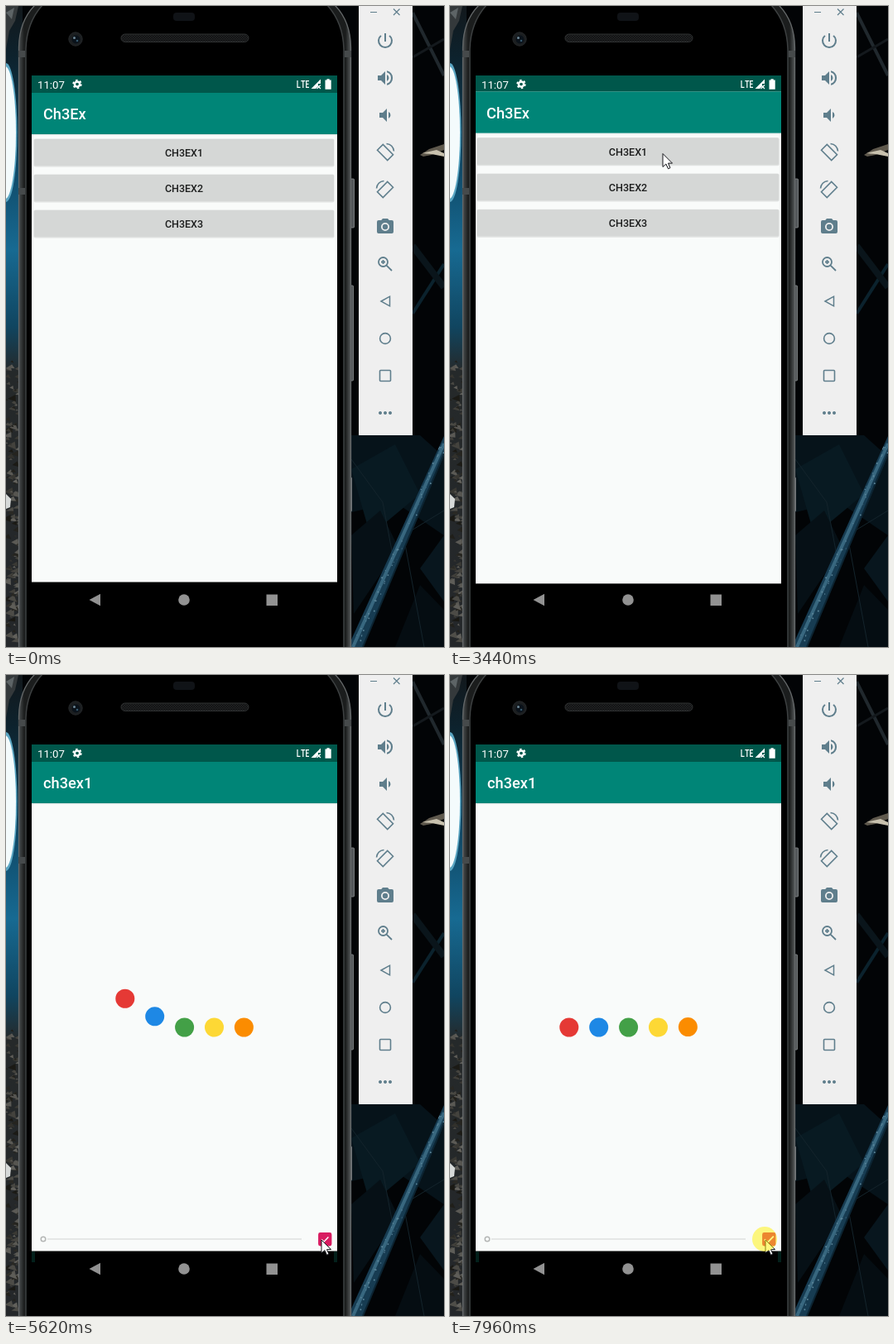
An HTML page that plays this animation: 529x775 px, repeating every 8000 ms.

```html
<!DOCTYPE html>
<html lang="en">
<head>
<meta charset="utf-8">
<title>Emulator demo</title>
<style>
html, body { margin: 0; width: 100%; height: 100%; overflow: hidden; background: #020406; }
svg { display: block; }
text { font-family: Roboto, sans-serif; }
.title { font-size: 18.2px; font-weight: 500; fill: #fff; }
.label { font-size: 12.5px; font-weight: 500; fill: #1d1e1e; text-anchor: middle; }
</style>
</head>
<body>
<svg width="529" height="775" viewBox="0 0 529 775">
  <defs>
    <linearGradient id="sky" x1="0" y1="0" x2="0" y2="1">
      <stop offset="0" stop-color="#12181c"/>
      <stop offset=".08" stop-color="#0d222d"/>
      <stop offset=".25" stop-color="#0f4866"/>
      <stop offset=".38" stop-color="#176a92"/>
      <stop offset=".5" stop-color="#104560"/>
      <stop offset=".57" stop-color="#25292a"/>
      <stop offset="1" stop-color="#24272a"/>
    </linearGradient>
    <linearGradient id="edge">
      <stop offset="0" stop-color="#4b4f50"/>
      <stop offset=".016" stop-color="#1b1d1d"/>
      <stop offset=".984" stop-color="#1b1d1d"/>
      <stop offset="1" stop-color="#565a5b"/>
    </linearGradient>
    <pattern id="mesh" width="3" height="3" patternUnits="userSpaceOnUse">
      <rect width="3" height="3" fill="#242526"/>
      <path d="M0 0h1.5v1.5H0zM1.5 1.5H3V3H1.500z" fill="#0e0f10"/>
    </pattern>
    <clipPath id="view"><rect x="31" y="84" width="369" height="627"/></clipPath>
    <clipPath id="page"><rect x="31" y="84" width="369" height="613"/></clipPath>
    <g id="window">
      <rect x="31" y="696" width="369" height="21"/>
      <rect x="31" y="84" width="369" height="612.500" fill="#f9fbfa"/>
      <rect x="31" y="155" width="369" height="1" fill="#dce4e2"/>
      <rect x="31" y="156" width="369" height="1" fill="#f1f5f4"/>
      <rect x="31" y="105" width="369" height="50" fill="#008577"/>
      <rect x="31" y="84" width="369" height="21" fill="#00574b"/>
    </g>
  </defs>

  <rect width="529" height="775" fill="#020406"/>
  <rect width="20" height="775" fill="url(#sky)"/>
  <ellipse cx="0" cy="153" rx="13.500" ry="84" fill="#5aa5c2"/>
  <ellipse cx="-1" cy="153" rx="13" ry="80" fill="#f4fbfc"/>
  <path d="M0 0H15L11 18 4 30 0 52z" fill="#34393b"/>
  <path d="M0 8L10 2 7 16z" fill="#5d6466"/>
  <g id="debris"></g>
  <path d="M0 590L6 596 5 606 0 608z" fill="#d6d9d8"/>

  <g fill="none">
    <path d="M491 8L529 84" stroke="#20282d" stroke-width="4"/>
    <path d="M491 62L529 40" stroke="#14191d" stroke-width="3"/>
    <path d="M491 372L529 312" stroke="#0b222d" stroke-width="4"/>
    <path d="M491 290L529 340" stroke="#0a151b" stroke-width="8"/>
  </g>
  <path d="M500 180L511 173 529 167V174L514 180 504 182z" fill="#5f594d"/>
  <path d="M503 178L520 174 529 178V182L514 179z" fill="#c8c1ae"/>
  <path d="M417 519H500L529 545V640L470 600 417 612z" fill="#06131a"/>
  <path d="M417 560L470 530 500 590 440 640z" fill="#081a22"/>
  <path d="M417 640L452 610 474 655 420 735z" fill="#061016"/>
  <path d="M529 640L500 680 529 720z" fill="#08161e"/>
  <path d="M470 775L500 700 529 730V775z" fill="#050d12"/>
  <path d="M417 548L455 600 470 680M529 610L480 640 505 775" fill="none" stroke="#14242c"/>
  <path d="M529 520V543L431 775H413z" fill="#173c52"/>
  <path d="M529 529L419 775" stroke="#38677f" stroke-width="4"/>
  <path d="M529 541L431 775" stroke="#0c2432" stroke-width="2"/>
  <g id="specks"></g>

  <g fill="#54585a" stroke="#8b8f90" stroke-width=".8">
    <rect x="415" y="209" width="5.500" height="59" rx="1"/>
    <rect x="414" y="338" width="5.500" height="115" rx="1"/>
    <rect x="413" y="570" width="4.500" height="41" rx="1"/>
  </g>
  <path d="M15.500 780V50Q16 12 43 -8H389Q416 12 416.500 50V780z" fill="url(#edge)" stroke="#65696a" stroke-width="1.300"/>
  <path d="M24 780V52Q25 16 49 -6H383Q407 16 408 52V780z" stroke="#3d4041" stroke-width="1.500"/>
  <path d="M15 54h8v8h-8zM409 54h8v8h-8zM15 220h8v8h-8z" fill="#464a4b"/>
  <rect x="202" y="8" width="26" height="10" rx="4" fill="#101317"/>
  <rect x="139" y="34" width="154" height="9.500" rx="4.700" fill="url(#mesh)" stroke="#303233"/>
  <circle cx="84" cy="40" r="8.200" fill="#1c1f21" stroke="#242729"/>
  <circle cx="84.500" cy="40.500" r="5" fill="#0a121a"/>
  <circle cx="82.500" cy="38.500" r="1.500" fill="#6d8796"/>
  <circle cx="86" cy="42" r="1.300" fill="#35566b"/>

  <g clip-path="url(#view)">
    <g id="menu">
      <use href="#window"/>
      <text class="title" x="45" y="137.300">Ch3Ex</text>
      <g id="buttons"></g>
    </g>
    <g id="demo">
      <use href="#window"/>
      <text class="title" x="45" y="137.300">ch3ex1</text>
      <g id="dots"></g>
      <path id="rail" d="M50 682H357" stroke-width="1.800"/>
      <circle id="thumb" cx="45" cy="682"/>
      <g clip-path="url(#page)"><circle id="ripple" cx="385" cy="682" r="18"/></g>
      <rect id="box" x="378" y="675" width="14.500" height="14.500" rx="1.500" stroke-width="1.800"/>
      <path id="check" d="M-5.500 .3L-1.800 4 5.500 -3.600" fill="none" stroke="#fff" stroke-width="1.900"/>
    </g>
  </g>
  <path id="corners" d="M31 697h4v13h-4zM396 697h4v13h-4z" fill="#03201b"/>

  <text x="38" y="99.500" font-size="13.200" fill="#fff">11:07</text>
  <g transform="translate(86 94.500)" fill="none" stroke="#fff">
    <circle r="3.100" stroke-width="2.500"/>
    <circle r="4.800" stroke-width="1.800" stroke-dasharray="2.500 2.526"/>
  </g>
  <path d="M352 90V98.300H355.500M356.300 90.600H361.300M358.800 90.600V99M366 90.600H362.700V98.300H366M362.700 94.400H365.500" fill="none" stroke="#fff" stroke-width="1.200"/>
  <path d="M368.500 100L380 88.500V94H377V97L374 100z" fill="#fff"/>
  <path d="M375.500 95.500l4.500 4.500M380 95.500l-4.500 4.500" stroke="#fff" stroke-width="1.200"/>
  <path d="M385.500 89.500H387.500V88.300H390.700V89.500H392.700V100.700H385.500z" fill="#fff"/>

  <g fill="#929292">
    <path d="M100.500 718L114 710.800V725.200z"/>
    <circle cx="215" cy="718" r="6.800"/>
    <rect x="314.500" y="711.500" width="13.500" height="13.500"/>
  </g>

  <rect x="426" width="65" height="519" fill="#efefef"/>
  <g fill="none" stroke="#5f7e8c" stroke-width="1.200">
    <path d="M440 7.500h8M468 3.500l7.500 7.500M475.500 3.500L468 11"/>
  </g>
  <g id="tools"></g>

  <path id="cursor" d="M0 0V16L3.900 12.500 6.500 18.300 9 17.200 6.500 11.600H11.500z" fill="#fff" stroke="#14151a"/>
  <circle id="click" r="15" fill="#fff200" opacity=".5"/>
</svg>
<script>
const LOOP = 8000;
const $ = id => document.getElementById(id);
const set = (el, attrs) => { for (const k in attrs) el.setAttribute(k, attrs[k]); return el; };
const add = (parent, tag, attrs) =>
  parent.appendChild(set(document.createElementNS('http://www.w3.org/2000/svg', tag), attrs));

let seed = 7;
const rnd = () => (seed = seed * 16807 % 2147483647) / 2147483647;

// Rubble at the left edge, glints on the diagonal beam
for (let i = 0; i < 130; i++) {
  const x = rnd() * 16, y = 430 + rnd() * 345, r = 1.5 + rnd() * 4, v = 25 + rnd() * 75;
  add($('debris'), 'path', {
    d: `M${x - r} ${y}L${x + r * rnd()} ${y - r}L${x + r} ${y + r * rnd()}z`,
    fill: `rgb(${v},${v - 1},${v - 6})`
  });
}
for (let i = 0; i < 60; i++) {
  const k = rnd();
  add($('specks'), 'circle', {
    cx: 529 - 107 * k + rnd() * 9 - 5, cy: 532 + 243 * k, r: .4 + rnd() * .7, fill: '#5d879b'
  });
}

for (let i = 0; i < 3; i++) {
  const y = 161 + 43 * i;
  add($('buttons'), 'rect', { x: 33.5, y: y - .5, width: 363, height: 34, rx: 2, fill: '#e0e2e1' });
  add($('buttons'), 'rect', { x: 34, y, width: 362, height: 32, rx: 1.5, fill: '#d5d7d6' });
  add($('buttons'), 'text', { class: 'label', x: 215, y: y + 20.8 }).textContent = 'CH3EX' + (i + 1);
}
const firstButton = $('buttons').children[1];

const dots = ['#e53935', '#1e88e5', '#43a047', '#fdd835', '#fb8c00']
  .map((fill, i) => add($('dots'), 'circle', { cx: 143.8 + 35.9 * i, r: 11.5, fill }));

const rotate = 'M2.500 9.300L9.300 2.500 21.500 14.700 14.700 21.500zM13.500 1.500Q21.500 2.500 22.500 10.500';
const icons = [
  ['M13 3h-2v10h2zM17.800 5.200l-1.400 1.400A7 7 0 1 1 7.600 6.600L6.200 5.200A9 9 0 1 0 17.800 5.200z'],
  ['M3 9v6h4l5 5V4L7 9zM16.500 12A4.500 4.500 0 0 0 14 8v8A4.500 4.500 0 0 0 16.500 12zM14 3.200v2.100a7 7 0 0 1 0 13.400v2.100a9 9 0 0 0 0-17.600z'],
  ['M18.500 12A4.500 4.500 0 0 0 16 8v8A4.500 4.500 0 0 0 18.500 12zM5 9v6h4l5 5V4L9 9z'],
  [rotate, 1.6],
  [rotate, 1.6, -1],
  ['M9 2L7.200 4H4a2 2 0 0 0-2 2v12a2 2 0 0 0 2 2h16a2 2 0 0 0 2-2V6a2 2 0 0 0-2-2h-3.200L15 2zM12 7a5 5 0 1 1 0 10a5 5 0 1 1 0-10zM12 8.800a3.200 3.200 0 1 0 0 6.400a3.200 3.200 0 1 0 0-6.400z'],
  ['M9.500 4a5.500 5.500 0 1 0 0 11a5.500 5.500 0 1 0 0-11zM13.800 13.800L20 20M9.500 7v5M7 9.500h5', 1.8],
  ['M7 12L17.500 6.200V17.800z', 1.5],
  ['M12 5.600a6.400 6.400 0 1 0 0 12.800a6.400 6.400 0 1 0 0-12.800z', 1.6],
  ['M6.500 5.500h11a1 1 0 0 1 1 1v11a1 1 0 0 1-1 1h-11a1 1 0 0 1-1-1v-11a1 1 0 0 1 1-1z', 1.6],
  ['M6 10a2 2 0 1 0 .01 0zM12 10a2 2 0 1 0 .01 0zM18 10a2 2 0 1 0 .01 0z']
];
icons.forEach(([d, line, flip = 1], i) => add($('tools'), 'path', {
  d, transform: `translate(458 ${42 + 45 * i}) scale(${flip} 1) translate(-12 -12)`,
  fill: line ? 'none' : '#5f7e8c', stroke: line ? '#5f7e8c' : 'none',
  'stroke-width': line || 0, 'fill-rule': 'evenodd'
}));

// Bursts of screen updates: first, last, count
const bursts = [
  [170, 930, 11], [1020, 1420, 6], [1650, 1880, 2], [3440, 3760, 5], [3920, 4680, 11],
  [4750, 4910, 3], [5060, 5850, 11], [5940, 6700, 11], [6790, 7570, 11], [7650, 7960, 5]
];
function snap(t) {
  let out = 0;
  for (const [a, b, n] of bursts) {
    if (t < a) break;
    const step = (b - a) / (n - 1);
    out = a + Math.min(n - 1, Math.floor((t - a + 8) / step)) * step;
  }
  return out;
}

function track(keys, t) {
  const i = keys.findIndex(k => k[0] > t);
  if (i === 0) return keys[0].slice(1);
  if (i < 0) return keys[keys.length - 1].slice(1);
  const a = keys[i - 1], b = keys[i], k = (t - a[0]) / (b[0] - a[0]);
  return a.slice(1).map((v, j) => v + (b[j + 1] - v) * k);
}

const pointer = [
  [170, 355, 757], [400, 305, 570], [630, 240, 360], [780, 231, 255], [930, 242, 200],
  [1020, 246, 180], [1180, 259, 164], [1340, 258, 174], [1420, 257, 178.500], [3844, 257, 178.500],
  [4376, 328.500, 502.500], [4600, 373, 640], [4680, 379, 667], [4750, 380, 676], [4910, 381, 683]
];
// menu scale, demo scale, demo opacity
const opening = [
  [3360, 1, .85, 0], [3440, 1.006, .86, 0], [3520, 1.030, .91, .6],
  [3600, 1.046, .976, 1], [3680, 1.046, .992, 1], [3760, 1.046, 1, 1]
];
const zoom = k => `translate(215.500 390.500) scale(${k}) translate(-215.500 -390.500)`;

const BOUNCE = { starts: [5297, 6620], lag: 190, half: 300, height: 35 };
function lift(t, i) {
  let y = 0;
  for (const s of BOUNCE.starts) {
    const k = (t - s - i * BOUNCE.lag) / BOUNCE.half;
    if (k > 0 && k < 2) y = BOUNCE.height * (1 - Math.cos(Math.PI * k)) / 2;
  }
  return y;
}

const within = (t, a, b) => t >= a && t < b;

function render(time) {
  const t = snap(time);
  const [menu, demo, alpha] = track(opening, t);
  set($('menu'), { transform: zoom(menu), visibility: t < 3760 ? 'visible' : 'hidden' });
  set($('demo'), { transform: zoom(demo), opacity: alpha });
  set($('corners'), { visibility: t >= 3760 ? 'visible' : 'hidden' });
  set(firstButton, { fill: within(t, 1650, 1880) ? '#c3c5c4' : '#d5d7d6' });

  dots.forEach((dot, i) => set(dot, { cy: 426 - lift(t, i) }));

  const on = t >= 5130;
  set($('rail'), { stroke: on ? '#e5e7e6' : '#d9dbda' });
  set($('thumb'), on
    ? { r: 2.8, fill: '#f9fbfa', stroke: '#b4b6b5', 'stroke-width': 1.5 }
    : { r: 5.4, fill: '#cb2257', stroke: 'none' });
  set($('box'), { fill: on ? '#d81b60' : 'none', stroke: on ? '#d81b60' : '#757777' });
  set($('check'), {
    transform: `translate(385.300 682.200) scale(${t < 5700 ? .75 : 1})`,
    visibility: on ? 'visible' : 'hidden'
  });
  set($('ripple'), { opacity: within(t, 5060, 5450) ? .12 * (1 - (t - 5060) / 390) : 0 });

  const [x, y] = track(pointer, t);
  set($('cursor'), { transform: `translate(${x} ${y})`, visibility: t >= 170 ? 'visible' : 'hidden' });
  const down = within(t, 1650, 1880) || within(t, 5060, 5200) || t >= 7950;
  set($('click'), { cx: x - 1, cy: y - 1, visibility: down ? 'visible' : 'hidden' });
}

const origin = performance.now();
function loop() {
  render((performance.now() - origin) % LOOP);
  requestAnimationFrame(loop);
}
loop();
</script>
</body>
</html>
```
